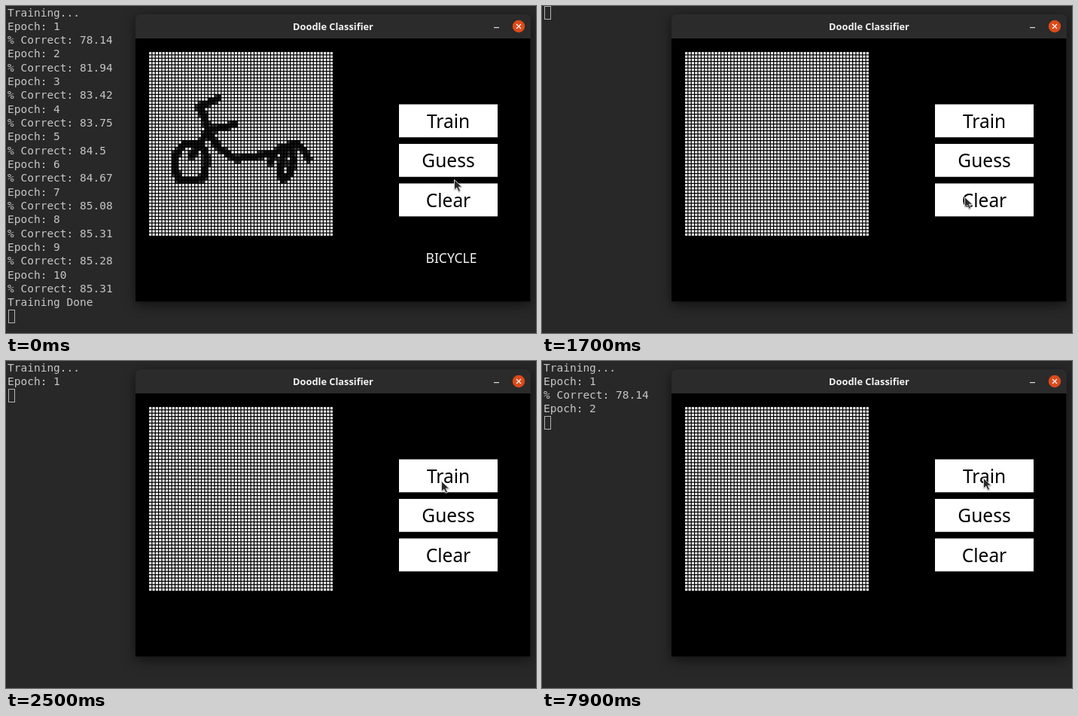
Animation, 704 px wide and 434 px high, one loop 8000 ms. Source, as an HTML page with a canvas:

```html
<!DOCTYPE html>
<html lang="en">
<head>
<meta charset="utf-8">
<title>Doodle Classifier</title>
<style>
html, body { margin: 0; width: 100%; height: 100%; overflow: hidden; background: #282828; }
canvas { display: block; }
</style>
</head>
<body>
<canvas id="stage" width="704" height="434"></canvas>
<script>
const ctx = document.getElementById('stage').getContext('2d');
const LOOP = 8000, CELL = 4.375, CELLS = 56, GRID_X = 189.5, GRID_Y = 60.5;
const SANS = '"Noto Sans", "Open Sans", sans-serif';
const MONO = '"DejaVu Sans Mono", monospace';

const scores = ['78.14', '81.94', '83.42', '83.75', '84.5', '84.67', '85.08', '85.31', '85.28', '85.31'];
const fullLog = ['Training...',
  ...scores.flatMap((s, i) => ['Epoch: ' + (i + 1), '% Correct: ' + s]),
  'Training Done'];

// Pointer positions: [start ms, x, y]
const pointerSteps = [
  [0, 595, 230], [700, 357, 58], [800, 364, 53], [900, 373, 49], [1000, 380, 47],
  [1300, 383, 46], [1500, 432, 102], [1600, 512, 196], [1700, 561, 253],
  [1800, 603, 259], [1900, 631, 222], [2000, 601, 177], [2100, 578, 159],
  [2800, 583, 157], [2900, 586, 155]
];

// Pen strokes of the bicycle, as x,y pairs
const strokes = [
  [283, 122, 272, 127, 257, 134, 264, 149, 268, 164, 261, 178, 247, 199],
  [304, 156, 290, 161, 268, 165],
  [267, 168, 284, 189, 305, 203, 335, 199, 358, 194],
  [236, 183, 226, 197, 224, 215, 230, 230, 245, 232, 262, 228, 266, 212, 265, 192, 255, 184, 236, 183],
  [352, 208, 355, 196, 368, 187, 386, 183, 395, 190, 401, 202],
  [369, 188, 367, 205, 364, 222, 368, 231, 378, 222, 381, 205, 379, 190]
];

function segmentDistance(x, y, ax, ay, bx, by) {
  const dx = bx - ax, dy = by - ay;
  const k = Math.max(0, Math.min(1, ((x - ax) * dx + (y - ay) * dy) / (dx * dx + dy * dy)));
  return Math.hypot(x - ax - k * dx, y - ay - k * dy);
}

function inkDistance(x, y) {
  let best = Infinity;
  for (const s of strokes)
    for (let i = 0; i + 3 < s.length; i += 2)
      best = Math.min(best, segmentDistance(x, y, s[i], s[i + 1], s[i + 2], s[i + 3]));
  return best;
}

function makeGrid(withDoodle) {
  const layer = document.createElement('canvas');
  layer.width = 704;
  layer.height = 434;
  const g = layer.getContext('2d');
  for (let row = 0; row < CELLS; row++)
    for (let col = 0; col < CELLS; col++) {
      const x = GRID_X + col * CELL, y = GRID_Y + row * CELL;
      const d = withDoodle ? inkDistance(x + CELL / 2, y + CELL / 2) : 99;
      g.fillStyle = d < 3.6 ? '#141414' : d < 5.2 ? '#383634' : '#fff';
      g.fillRect(x + 0.65, y + 0.65, 3.1, 3.1);
    }
  return layer;
}
const emptyGrid = makeGrid(false), doodleGrid = makeGrid(true);

function text(str, x, y, font, color, align = 'center') {
  ctx.font = font;
  ctx.fillStyle = color;
  ctx.textAlign = align;
  ctx.fillText(str, x, y);
}

function drawTerminal(lines) {
  ctx.fillStyle = '#282828';
  ctx.fillRect(0, 0, 704, 434);
  const pitch = 18.33;
  lines.forEach((line, i) => text(line, 2, 13.5 + i * pitch, '14.5px ' + MONO, '#c6c6c6', 'left'));
  ctx.strokeStyle = '#b4b4b4';
  ctx.lineWidth = 1;
  ctx.strokeRect(3.5, Math.round(lines.length * pitch) + 0.5, 8, 17);
}

function drawWindow() {
  ctx.save();
  ctx.shadowColor = 'rgba(0,0,0,.55)';
  ctx.shadowBlur = 16;
  ctx.shadowOffsetY = 4;
  ctx.fillStyle = '#2b2b2b';
  ctx.beginPath();
  ctx.roundRect(172, 11, 525, 382, [7, 7, 0, 0]);
  ctx.fill();
  ctx.restore();
  ctx.fillStyle = '#000';
  ctx.fillRect(172, 43, 524.5, 349.5);

  text('Doodle Classifier', 434.5, 32, 'bold 12.8px "Open Sans", ' + SANS, '#f2f2f2');
  ctx.fillStyle = '#dedede';
  ctx.fillRect(648, 28, 7, 1.2);
  ctx.fillStyle = '#dc4a1a';
  ctx.beginPath();
  ctx.arc(681, 27, 8.2, 0, 7);
  ctx.fill();
  ctx.strokeStyle = '#fff';
  ctx.lineWidth = 1.2;
  ctx.beginPath();
  ctx.moveTo(678, 24); ctx.lineTo(684, 30);
  ctx.moveTo(684, 24); ctx.lineTo(678, 30);
  ctx.stroke();

  ['Train', 'Guess', 'Clear'].forEach((label, i) => {
    const y = 130.5 + i * 52.5;
    ctx.fillStyle = '#fff';
    ctx.fillRect(522, y, 131, 43.75);
    text(label, 587.5, y + 31, '24.5px ' + SANS, '#000');
  });
}

const arrow = new Path2D('M.5 .5V14L3.8 11.1L6.2 16.3L8.6 15.2L6.2 10.2H10.7Z');
function drawPointer(x, y) {
  ctx.save();
  ctx.translate(x, y);
  ctx.shadowColor = 'rgba(0,0,0,.4)';
  ctx.shadowBlur = 2;
  ctx.shadowOffsetY = 1;
  ctx.fillStyle = '#2a2a2a';
  ctx.fill(arrow);
  ctx.shadowColor = 'transparent';
  ctx.strokeStyle = '#d8d8d8';
  ctx.lineWidth = 1;
  ctx.stroke(arrow);
  ctx.restore();
}

function draw(t) {
  const guessed = t < 700;
  const count = t < 2500 ? 0 : t < 6000 ? 2 : 4;
  drawTerminal(guessed ? fullLog : fullLog.slice(0, count));
  drawWindow();
  ctx.drawImage(guessed ? doodleGrid : emptyGrid, 0, 0);
  if (guessed) text('BICYCLE', 591.5, 341, '17.5px ' + SANS, '#f4f4f4');
  const [, x, y] = pointerSteps.findLast(step => step[0] <= t);
  drawPointer(x, y);
}

const start = performance.now();
function tick() {
  draw((performance.now() - start) % LOOP);
  requestAnimationFrame(tick);
}
tick();
</script>
</body>
</html>
```
